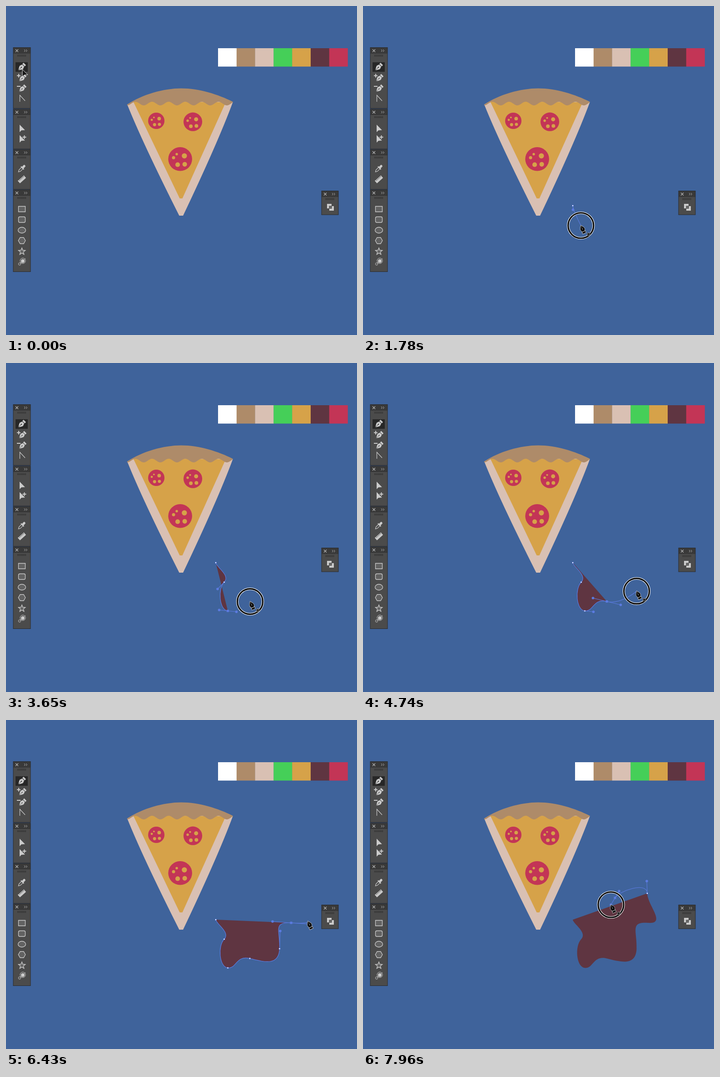
These frames come from a looping animation (773x725 px, 8000 ms). An HTML page with a canvas:

```html
<!DOCTYPE html>
<html lang="en">
<head>
<meta charset="utf-8">
<title>Pizza drawing</title>
<style>
  html, body { margin: 0; width: 100%; height: 100%; overflow: hidden; background: #3f639b; }
  canvas { display: block; }
</style>
</head>
<body>
<canvas id="stage" width="773" height="725"></canvas>
<script>
const ctx = document.getElementById('stage').getContext('2d');
const LOOP = 8000, TAU = Math.PI * 2;
const BLUE = '#5b7be0', LIGHT = '#cbcbcb', DARK = '#5f3541';
const CRUST = '#ae8b69', DOUGH = '#d9c0b3', CHEESE = '#d6a249', RED = '#c33556';

// Anchors: position, outgoing handle, mouse down and mouse up times.
const anchors = [
  { p: [462, 440], out: [462.5, 449], down: 1000, up: 1250 },
  { p: [480.5, 483], out: [466, 498], down: 1690, up: 2300 },
  { p: [488.5, 546.3], out: [507.5, 548.3], down: 2750, up: 3180 },
  { p: [537, 525.5], out: [567.5, 533], down: 3590, up: 4200 },
  { p: [602.5, 504], out: [604, 465], down: 4665, up: 5260 },
  { p: [628, 447], out: [669, 450], down: 5870, up: 6320 },
  { p: [626, 382], out: [625, 355], down: 6780, up: 7180 },
  { p: [555, 392], out: [546, 407], down: 7560, up: 8020 }
];
const BLINK = 70;   // preview is off this long after mouse down
const HOLD = 100;   // delay before the dragged curve replaces the preview

const keys = [[0, [36, 139.5]], [80, [36, 139.5]]];
for (const a of anchors) {
  keys.push([a.down - 50, a.p], [a.down + 20, a.p], [a.up - 60, a.out], [a.up + 40, a.out]);
}

function cursorAt(t) {
  let i = 0;
  while (i < keys.length - 2 && keys[i + 1][0] <= t) i++;
  const [t0, a] = keys[i], [t1, b] = keys[i + 1];
  const u = Math.min(1, Math.max(0, (t - t0) / (t1 - t0)));
  const e = u * u * (3 - 2 * u);
  return [a[0] + (b[0] - a[0]) * e, a[1] + (b[1] - a[1]) * e];
}

const mirror = (p, h) => [2 * p[0] - h[0], 2 * p[1] - h[1]];

function fill(color) { ctx.fillStyle = color; ctx.fill(); }

function stroke(color, width = 1) {
  ctx.strokeStyle = color;
  ctx.lineWidth = width;
  ctx.stroke();
}

function rect(x, y, w, h, color) { ctx.fillStyle = color; ctx.fillRect(x, y, w, h); }

function circle(x, y, r, color) {
  ctx.beginPath();
  ctx.arc(x, y, r, 0, TAU);
  if (color) fill(color);
}

function poly(points, close = true) {
  ctx.beginPath();
  points.forEach(([x, y]) => ctx.lineTo(x, y));
  if (close) ctx.closePath();
}

function line(points, color, width = 1) { poly(points, false); stroke(color, width); }

function at(x, y, angle, scale, draw) {
  ctx.save();
  ctx.translate(x, y);
  ctx.rotate(angle * TAU / 360);
  ctx.scale(scale, scale);
  draw();
  ctx.restore();
}

// Pizza

function pepperoni(x, y, r) {
  circle(x, y, r, RED);
  const k = r / 26.3;
  const holes = [[9.2, -7, 5.7], [10, 11.5, 5.1], [-5.6, 12.4, 5.1], [-14.6, -3, 3.5], [-7.6, -10.8, 2.7]];
  for (const [dx, dy, hr] of holes) circle(x + dx * k, y + dy * k, hr * k, CHEESE);
}

function pizza() {
  ctx.beginPath();
  ctx.moveTo(267, 217);
  ctx.quadraticCurveTo(300, 300, 381.5, 462);
  ctx.lineTo(390, 462);
  ctx.quadraticCurveTo(467, 300, 499.5, 212);
  ctx.lineTo(484, 206);
  ctx.lineTo(281, 209);
  ctx.closePath();
  fill(DOUGH);
  poly([[280, 210], [382.5, 424], [388.5, 424], [484, 212]]);
  fill(CHEESE);
  ctx.beginPath();
  ctx.moveTo(267, 217);
  ctx.bezierCurveTo(300, 195, 347, 181.5, 386, 181.5);
  ctx.bezierCurveTo(425, 181.5, 468, 195, 499.5, 211);
  for (let x = 499.5; x >= 266.5; x -= 1) ctx.lineTo(x, 215 - 4 * Math.cos(TAU * (x - 285) / 36.6));
  ctx.closePath();
  fill(CRUST);
  pepperoni(331, 253, 18);
  pepperoni(411.5, 255.2, 20.6);
  pepperoni(383.6, 337.3, 26.3);
}

function palette() {
  const colors = ['#ffffff', CRUST, DOUGH, '#45cf58', CHEESE, DARK, RED];
  colors.forEach((c, i) => rect(467 + i * 40.8, 93, 41, 40.5, c));
}

// Panels and tool icons

function panel(x, y, w, h) {
  rect(x - 0.5, y - 0.5, w + 1, h + 1, '#2a2b2d');
  rect(x + 0.5, y + 13, w - 1, h - 13.5, '#4b4b4b');
  rect(x + 0.5, y + 0.5, w - 1, 12, '#393939');
  const cx = x + 8, cy = y + 7;
  line([[cx - 3, cy - 3], [cx + 3, cy + 3]], '#b8b8b8', 1.1);
  line([[cx + 3, cy - 3], [cx - 3, cy + 3]], '#b8b8b8', 1.1);
  for (const dx of [w - 14, w - 10]) {
    line([[x + dx, cy - 2.5], [x + dx + 2.5, cy], [x + dx, cy + 2.5]], '#b8b8b8');
  }
  for (let i = 0; i < 10; i++) rect(x + w / 2 - 10 + i * 2, y + 16, 1, 4, '#303030');
}

function nib(color, slit, edge) {
  ctx.beginPath();
  ctx.moveTo(0, 0);
  ctx.quadraticCurveTo(4.6, 6, 4.8, 9);
  ctx.lineTo(3, 14);
  ctx.lineTo(-3, 14);
  ctx.lineTo(-4.8, 9);
  ctx.quadraticCurveTo(-4.6, 6, 0, 0);
  ctx.closePath();
  if (edge) stroke(edge, 1.4);
  fill(color);
  if (edge) rect(-4.4, 14, 8.8, 5.4, edge);
  rect(-3.6, 15, 7.2, 3.6, color);
  line([[0, 1], [0, 8]], slit, 0.8);
  circle(0, 8.5, 1.2, slit);
}

function pointer(x, y, color, edge) {
  at(x, y, 0, 1, () => {
    poly([[0, 0], [0, 16.5], [4, 12.6], [11.8, 12]]);
    fill(color);
    if (edge) stroke(edge);
  });
}

function plus(x, y) {
  rect(x - 4, y - 1, 8, 2, LIGHT);
  rect(x - 1, y - 4, 2, 8, LIGHT);
}

function ring(n, radius, offset = 0) {
  return Array.from({ length: n }, (_, i) => {
    const a = TAU * i / n + offset, r = radius(i);
    return [Math.cos(a) * r, Math.sin(a) * r];
  });
}

function shapeIcon() {
  fill('#626262');
  stroke(LIGHT, 1.3);
}

function toolIcons() {
  rect(21, 124, 27, 21, '#272727');
  at(27.5, 141.5, -135, 1.05, () => nib(LIGHT, '#272727'));
  at(29.5, 165.5, -135, 1, () => nib(LIGHT, '#4b4b4b'));
  at(29.5, 188.5, -135, 1, () => nib(LIGHT, '#4b4b4b'));
  plus(28, 153.5);
  rect(24, 176, 8, 2, LIGHT);
  line([[30.5, 211], [30.5, 196.5], [42, 209]], LIGHT, 1.2);

  pointer(30, 261.5, LIGHT);
  pointer(30, 284.5, LIGHT);
  plus(40.5, 289);

  at(34.5, 358.5, 45, 1, () => {
    ctx.beginPath();
    ctx.roundRect(-2.6, -10.5, 5.2, 8, 2.4);
    fill(LIGHT);
    rect(-4.5, -3.5, 9, 2.4, LIGHT);
    poly([[-2.2, -1], [-2.2, 6], [0, 10], [2.2, 6], [2.2, -1]], false);
    stroke(LIGHT, 1.2);
  });
  at(35, 382, -42, 1, () => {
    rect(-9, -3.6, 18, 7.2, LIGHT);
    for (let i = -6; i <= 6; i += 3) rect(i, -3.6, 1, 3, '#4b4b4b');
  });

  ctx.beginPath(); ctx.rect(27.5, 441.5, 15, 12); shapeIcon();
  ctx.beginPath(); ctx.roundRect(27.5, 464.5, 15, 12.5, 3); shapeIcon();
  ctx.beginPath(); ctx.ellipse(35, 494, 8.4, 6.5, 0, 0, TAU); shapeIcon();
  at(35, 517, 0, 1, () => { poly(ring(6, () => 7.8)); shapeIcon(); });
  at(35, 541, 0, 1, () => { poly(ring(10, i => i % 2 ? 3.4 : 8, -TAU / 4)); shapeIcon(); });
  circle(37, 561.5, 6);
  stroke(LIGHT);
  circle(37, 562, 4, LIGHT);
  line([[30, 569], [43, 556]], LIGHT);
  circle(30, 568.5, 2.6, '#4b4b4b');
  stroke(LIGHT);
}

function panels() {
  panel(16, 91.5, 38, 134);
  panel(16, 227, 38, 88);
  panel(16, 316, 38, 88);
  panel(16, 405, 38, 180.5);
  panel(695, 407.5, 37, 52.5);
  toolIcons();
  rect(707, 436, 10, 10, LIGHT);
  rect(712, 441, 10, 10, LIGHT);
  rect(711.5, 440.5, 6, 6, '#3c3c3c');
  rect(712.5, 441.5, 4, 4, '#707070');
}

// Path being drawn

function curveTo(from, to) {
  const inn = mirror(to.p, to.out);
  ctx.bezierCurveTo(...from.out, ...inn, ...to.p);
}

function trace(list) {
  ctx.beginPath();
  ctx.moveTo(...list[0].p);
  for (let i = 1; i < list.length; i++) curveTo(list[i - 1], list[i]);
}

function handle(p, h) {
  if (Math.hypot(h[0] - p[0], h[1] - p[1]) < 1) return;
  line([p, h], BLUE, 1.1);
  circle(...h, 2.8, BLUE);
}

function dot(p, selected) {
  if (selected) rect(p[0] - 2.5, p[1] - 2.5, 5, 5, BLUE);
  else {
    rect(p[0] - 1.7, p[1] - 1.7, 3.4, 3.4, BLUE);
    rect(p[0] - 1, p[1] - 1, 2, 2, '#ffffff');
  }
}

function drawPath(t, cur) {
  const done = anchors.filter(a => a.up <= t);
  const active = anchors.find(a => t >= a.down && t < a.up);
  if (!done.length) {
    if (active) dot(active.p, true);
    return;
  }
  const n = done.length, last = done[n - 1];
  if (n > 1) { trace(done); fill(DARK); }

  if (active && t > active.down + HOLD) {
    const moving = { p: active.p, out: cur };
    trace([last, moving]);
    stroke(BLUE, 1.1);
    handle(last.p, last.out);
    handle(moving.p, cur);
    handle(moving.p, mirror(moving.p, cur));
    dot(last.p, false);
    dot(moving.p, true);
    return;
  }

  handle(last.p, last.out);
  if (n > 1) {
    trace(done);
    stroke(BLUE, 1.2);
    if (n > 2) handle(done[n - 2].p, done[n - 2].out);
    handle(last.p, mirror(last.p, last.out));
  }
  if (!active || t > active.down + BLINK) {
    trace([last, { p: cur, out: cur }]);
    stroke(BLUE, 1.1);
  }
  done.forEach((a, i) => dot(a.p, i > 0 && i === n - 1));
}

function drawCursor(t, [x, y]) {
  if (x < 55) {
    pointer(x, y, '#161616', '#e6e6e6');
    return;
  }
  const pressed = anchors.some(a => t >= a.down && t < a.up);
  if (pressed) {
    circle(x, y, 28);
    stroke('#ffffff', 5.2);
    stroke('#0a0a0a', 3.2);
  }
  at(x, y, -25, 1, () => nib('#0a0a0a', '#707070', '#c8c8c8'));
  if (pressed || t < anchors[0].up) {
    at(x + 17, y + 19, 0, 1, () => {
      for (const [w, c] of [[2.6, '#d5d5d5'], [1.3, '#0a0a0a']]) {
        line([[-3.5, 0], [3.5, 0]], c, w);
        line([[-2.5, -3], [2.5, 3]], c, w);
        line([[2.5, -3], [-2.5, 3]], c, w);
      }
    });
  }
}

function frame(now) {
  const t = now % LOOP, cur = cursorAt(t);
  rect(0, 0, 773, 725, '#3f639b');
  palette();
  pizza();
  drawPath(t, cur);
  panels();
  drawCursor(t, cur);
  requestAnimationFrame(() => frame(performance.now() - start));
}

const start = performance.now();
frame(0);
</script>
</body>
</html>
```
